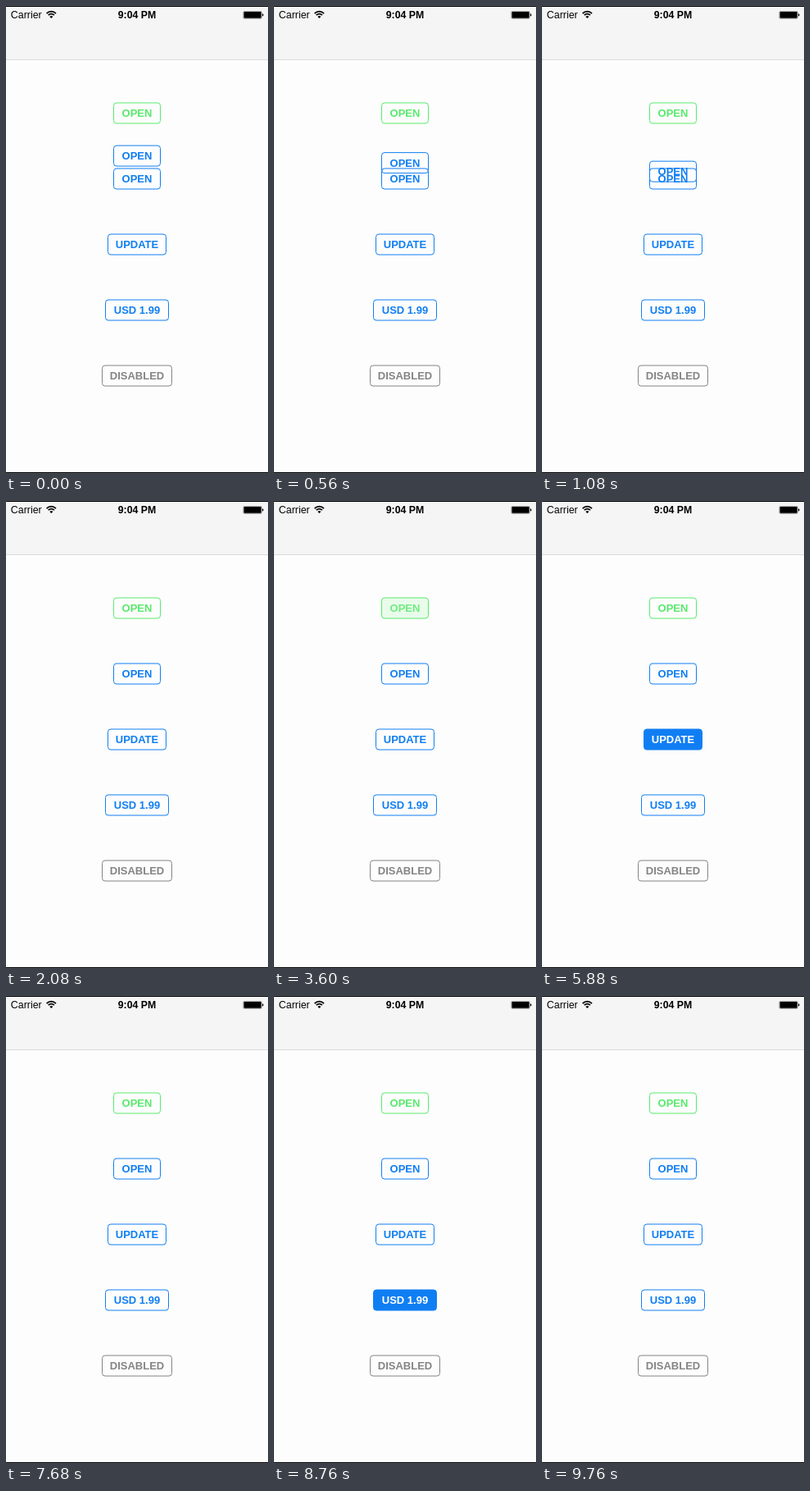
Recreate the animation shown at these times as an HTML page. Size 320 by 569 pixels, loop 9.88 s.

```html
<!DOCTYPE html>
<html lang="en">
<head>
<meta charset="utf-8">
<title>Outlined buttons</title>
<style>
  html, body { margin: 0; width: 100%; height: 100%; overflow: hidden; background: #fdfdfd; }
  svg { display: block; width: 100%; height: 100%; }
  text { font-family: "Liberation Sans", Arial, sans-serif; }
</style>
</head>
<body>
<svg id="stage" viewBox="0 0 320 569">
  <rect width="320" height="569" fill="#fdfdfd"/>
  <rect width="320" height="65" fill="#f5f5f5"/>
  <rect y="65" width="320" height="1" fill="#dadada"/>
  <path d="M0 .5H320M0 568.5H320" stroke="#000"/>
  <text x="5.8" y="15.1" font-size="12.4">Carrier</text>
  <g fill="none" stroke="#000" stroke-width="1.7">
    <path d="M49.6 9.1a8 8 0 0 1 11.4 0"/>
    <path d="M51.7 11.2a5 5 0 0 1 7.2 0"/>
  </g>
  <path d="M53.3 12.9a2.8 2.8 0 0 1 4 0l-2 2.1z"/>
  <text x="160" y="15.1" font-size="12.3" font-weight="700" text-anchor="middle">9:04 PM</text>
  <rect x="289.9" y="6.4" width="22.4" height="9" rx="1.4" fill="none" stroke="#555" stroke-width=".5"/>
  <rect x="290.5" y="7" width="21.2" height="7.8" rx=".8"/>
  <path d="M313 9.2q1.5 .3 1.5 1.7t-1.5 1.7z"/>
</svg>
<script>
const LOOP = 9880;
const BLUE = [16, 126, 243], GREEN = [88, 234, 108], GRAY = [132, 132, 132];
const WHITE = [255, 255, 255];
const FADE_IN = 420, FADE_OUT = 340;
const stage = document.getElementById("stage");

const clamp = v => Math.min(1, Math.max(0, v));
const rgb = c => `rgb(${c.map(Math.round)})`;
const mix = (a, b, p) => a.map((v, i) => v + (b[i] - v) * p);

// Cubic Bézier timing with handles (x1, 0) and (x2, 1).
function bezier(x1, x2) {
  return x => {
    x = clamp(x);
    let lo = 0, hi = 1, u = 0.5;
    for (let i = 0; i < 24; i++) {
      u = (lo + hi) / 2;
      const at = 3 * u * (1 - u) * (x1 * (1 - u) + x2 * u) + u ** 3;
      if (at < x) lo = u; else hi = u;
    }
    return u * u * (3 - 2 * u);
  };
}
const easeInOut = bezier(0.42, 0.58);
const easeOut = bezier(0, 0.58);

function add(parent, tag, attrs) {
  const el = document.createElementNS("http://www.w3.org/2000/svg", tag);
  for (const name in attrs) el.setAttribute(name, attrs[name]);
  return parent.appendChild(el);
}

function button(label, cy, width, color, press) {
  const group = add(stage, "g", {});
  const box = add(group, "rect", {
    x: 160 - width / 2, y: cy - 12.5, width, height: 25, rx: 3.5,
    fill: rgb(color), "fill-opacity": 0, stroke: rgb(color)
  });
  const text = add(group, "text", {
    x: 160, y: cy + 4.6, "font-size": 13, "font-weight": 700,
    "text-anchor": "middle", fill: rgb(color)
  });
  text.textContent = label;
  return { group, box, text, color, press };
}

const buttons = [
  button("OPEN", 130.5, 57, GREEN, [2500, 3360]),
  button("OPEN", 210.5, 57, BLUE),
  button("UPDATE", 290.5, 71, BLUE, [5170, 6420]),
  button("USD 1.99", 370.5, 77, BLUE, [8140, 9040]),
  button("DISABLED", 450.5, 85, GRAY)
];
const slider = button("OPEN", 210.5, 57, BLUE);

function draw(t) {
  for (const { box, text, color, press } of buttons) {
    if (!press) continue;
    const [down, up] = press;
    const level = t < up ? easeInOut((t - down) / FADE_IN) : 1 - easeOut((t - up) / FADE_OUT);
    box.setAttribute("fill-opacity", level);
    text.setAttribute("fill", rgb(mix(color, WHITE, level)));
  }
  // The slide is already under way when the loop begins.
  const offset = 30.2 * (1 - easeInOut((t + 480) / 2500));
  slider.group.setAttribute("transform", `translate(0 ${-offset})`);
  slider.group.setAttribute("display", t < 2020 ? "inline" : "none");
}

const start = performance.now();
function tick() {
  draw((performance.now() - start) % LOOP);
  requestAnimationFrame(tick);
}
draw(0);
requestAnimationFrame(tick);
</script>
</body>
</html>
```
